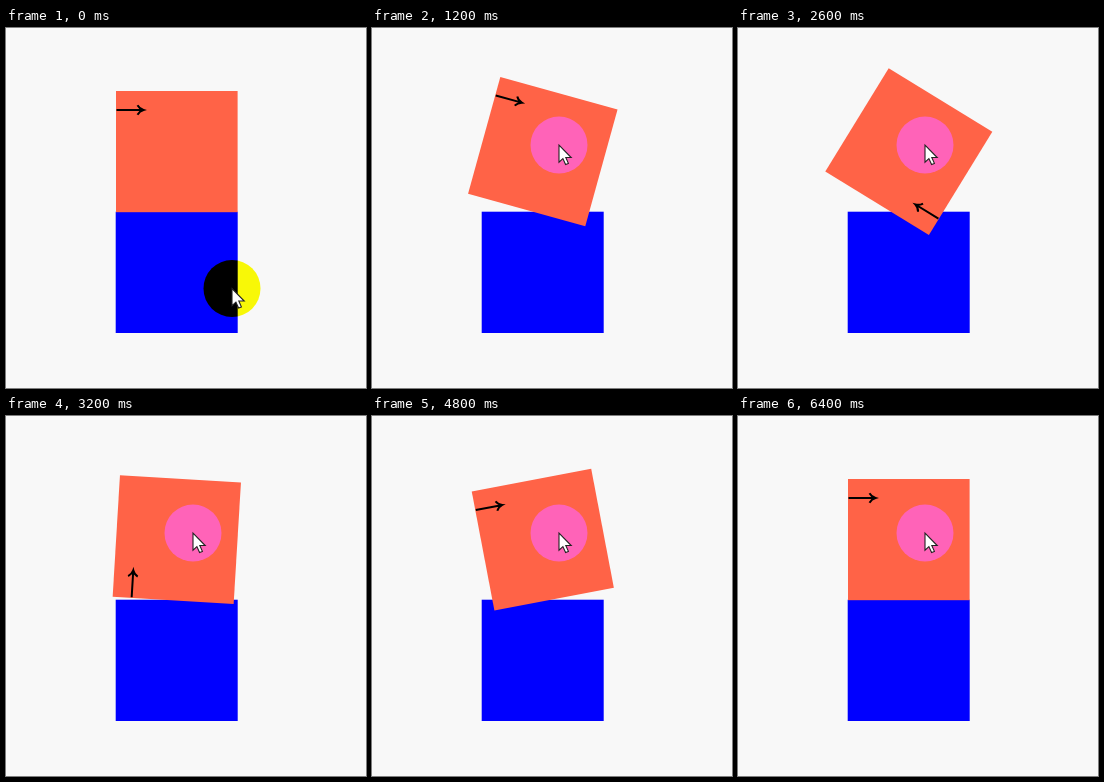
These frames come from a looping animation (360 by 360 pixels, 6.6 s). An HTML page:

```html
<!DOCTYPE html>
<html lang="en">
<head>
<meta charset="utf-8">
<title>Rotating square</title>
<style>
  html, body { margin: 0; height: 100%; overflow: hidden; background: #f8f8f8; }
  svg { display: block; width: 100vw; height: 100vh; }
  #spot { fill: #00f; mix-blend-mode: difference; }
</style>
</head>
<body>
<svg viewBox="0 0 360 360">
  <rect width="360" height="360" fill="#f8f8f8"/>
  <rect x="109.7" y="183.7" width="122" height="121.3" fill="#00f"/>
  <g id="box">
    <rect x="110" y="63" width="121.6" height="121.2" fill="tomato"/>
    <path d="M110.5 82H136.5M131.5 77.2Q133.5 80.8 137.5 82Q133.5 83.2 131.5 86.8"
          fill="none" stroke="#000" stroke-width="2"/>
  </g>
  <circle id="spot" r="28.5"/>
  <path id="pointer" d="M0 0V17.2L3.9 13.6L6.6 19.6L9.4 18.4L6.8 12.5H12.2Z"
        fill="#fff" stroke="#222" stroke-width="1.1"/>
</svg>
<script>
const LOOP = 6600, STEP = 200, START = 900, TURN = 5000;
const [box, spot, pointer] = ["box", "spot", "pointer"].map(id => document.getElementById(id));
const clamp = v => Math.min(1, Math.max(0, v));
const mix = (a, b, p) => a + (b - a) * p;

// cubic-bezier(.25, .1, .25, 1), solved by bisection
function ease(x) {
  let lo = 0, hi = 1;
  for (let i = 0; i < 30; i++) {
    const s = (lo + hi) / 2;
    if (0.75 * s * (1 - s) + s ** 3 < x) lo = s; else hi = s;
  }
  const s = (lo + hi) / 2;
  return 0.3 * s * (1 - s) ** 2 + 3 * s * s * (1 - s) + s ** 3;
}

function draw(now) {
  const t = Math.floor(now % LOOP / STEP) * STEP;
  const turn = clamp((t - START) / TURN);
  const angle = turn > 0 && turn < 1 ? 360 * ease(turn) : 0;
  box.setAttribute("transform", `rotate(${angle} 170.8 123.6)`);

  const p = clamp(t / 400);
  const place = `translate(${mix(226, 187, p)} ${mix(260.5, 117, p)})`;
  spot.setAttribute("transform", place);
  pointer.setAttribute("transform", place);
}

const begin = performance.now();
function tick() {
  draw(performance.now() - begin);
  requestAnimationFrame(tick);
}
tick();
</script>
</body>
</html>
```
